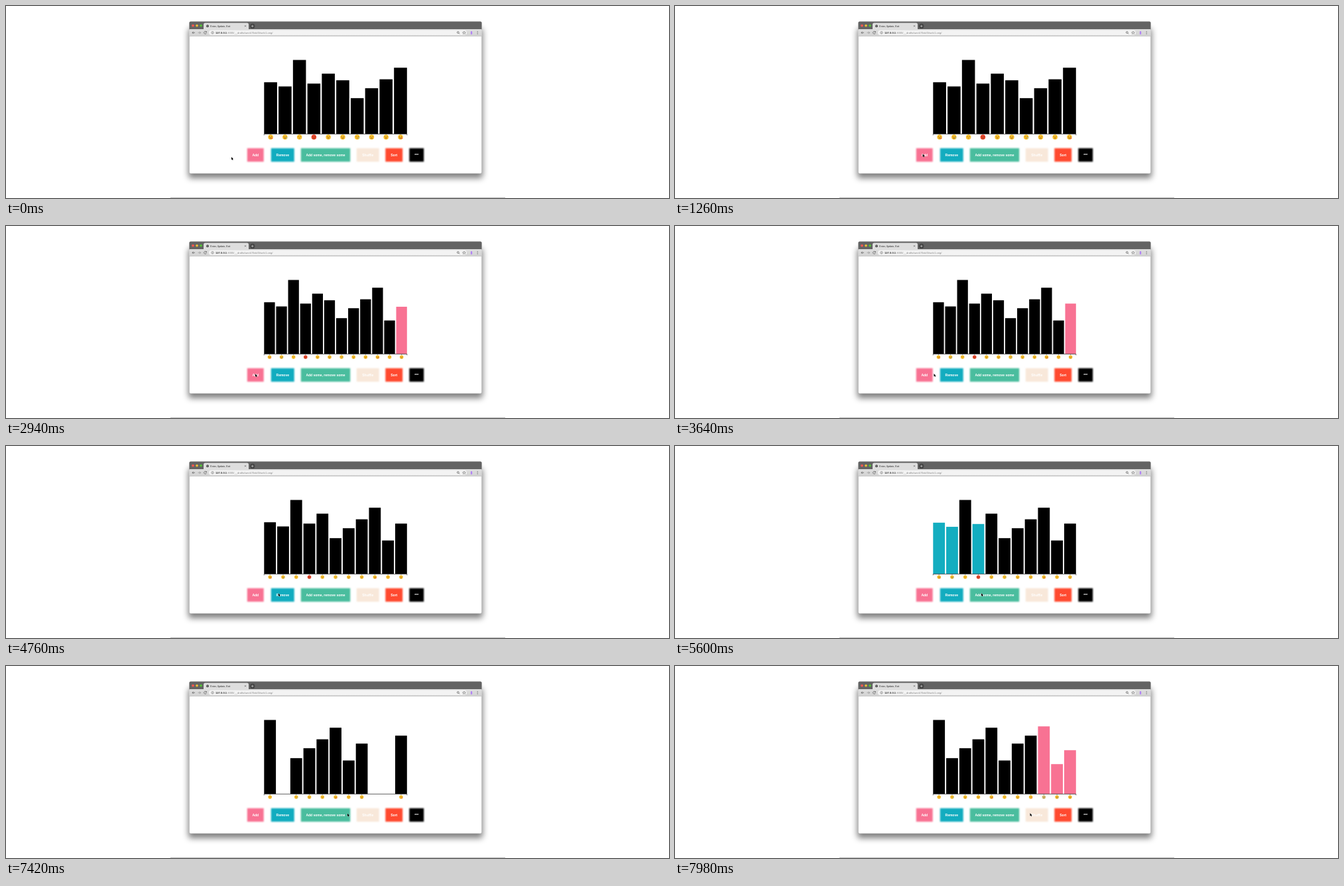
These frames come from a looping animation (1000 by 290 pixels, 8 s). An HTML page:

```html
<!DOCTYPE html>
<html lang="en">
<head>
<meta charset="utf-8">
<title>Enter, Update, Exit</title>
<style>
  html, body { margin: 0; width: 100%; height: 100%; overflow: hidden; background: #fff; }
  svg { display: block; width: 100%; height: 100%; }
  text { font-family: "Liberation Sans", Arial, sans-serif; }
  .shadow { filter: blur(5px); }
  .glow { filter: blur(1.1px); }
  .line { fill: none; stroke: #555; stroke-width: .7; }
  .label { font-size: 5px; font-weight: 700; text-anchor: middle; }
</style>
</head>
<body>
<svg id="stage" viewBox="0 0 1000 290">
  <defs>
    <linearGradient id="toolbar" x2="0" y2="1">
      <stop stop-color="#dedede"/><stop offset="1" stop-color="#d2d2d2"/>
    </linearGradient>
  </defs>
  <path d="M248 289.5H753" stroke="#bdbdbd"/>

  <rect class="shadow" x="275" y="34" width="444" height="226" rx="4" opacity=".5"/>
  <rect x="276.5" y="23.5" width="441" height="229.5" rx="2" fill="#fff" stroke="#aaa" stroke-width=".4"/>
  <path d="M276.5 36V25.5a2 2 0 0 1 2-2H715.500a2 2 0 0 1 2 2V36z" fill="#636363"/>
  <circle cx="282" cy="29.600" r="1.900" fill="#fb5752"/>
  <circle cx="288" cy="29.600" r="1.900" fill="#e6b93a"/>
  <circle cx="294" cy="29.600" r="1.900" fill="#55bf3a"/>
  <rect x="276.500" y="35" width="441" height="10.500" fill="url(#toolbar)"/>
  <path d="M298 35.500V28q0-2.500 2.500-2.500H363.500q2.500 0 2.500 2.500V35.500z" fill="#dedede"/>
  <rect x="306" y="36.600" width="389" height="7.400" rx="3.700" fill="#f3f3f3"/>
  <path d="M276.500 45.500H717.500" stroke="#b5b5b5" stroke-width=".6"/>

  <circle cx="304" cy="30.300" r="2" fill="#444"/>
  <path d="M302.600 29.800l1.400 .2 .4 1.400M304.600 28.800l1 1" stroke="#ddd" stroke-width=".5" fill="none"/>
  <text x="308.300" y="31.600" font-size="3.600" fill="#222">Enter, Update, Exit</text>
  <path class="line" d="M360 29.300l2 2m0-2l-2 2"/>
  <circle cx="371.700" cy="30.400" r="3.700" fill="#444"/>
  <path d="M369.900 30.400h3.600m-1.800-1.800v3.600" stroke="#ccc" stroke-width=".7"/>

  <path class="line" d="M285 40.300h-4m1.700-1.700l-1.700 1.700 1.700 1.700"/>
  <path class="line" d="M289.500 40.300h4m-1.700-1.700l1.700 1.700-1.700 1.700" opacity=".55"/>
  <path class="line" d="M302.100 39.300a1.900 1.900 0 1 0 .2 1.500M302.400 38v1.500h-1.500"/>
  <circle class="line" cx="311.500" cy="40.300" r="1.800" style="stroke-width:.5"/>
  <path class="line" d="M311.500 39.200v.5m0 .4v1.400" style="stroke-width:.5"/>
  <text x="316" y="41.800" font-size="4.100" fill="#888"><tspan fill="#333" font-weight="700">127.0.0.1</tspan>:3000/__drafts/week7/lab/3/web1-orig/</text>
  <circle class="line" cx="681.800" cy="39.900" r="1.400"/>
  <path class="line" d="M682.800 41l1.400 1.400"/>
  <path d="M691 38l.7 1.600 1.700 .1-1.300 1.100 .4 1.700-1.500-.9-1.500 .9 .4-1.700-1.300-1.100 1.700-.1z" fill="none" stroke="#555" stroke-width=".5"/>
  <rect x="700.900" y="38" width="2.300" height="5" rx="1.100" fill="#b184f5"/>
  <path d="M711.200 38.500v.1m0 1.700v.1m0 1.700v.1" stroke="#555" stroke-width="1" stroke-linecap="round"/>

  <g id="buttons"></g>
  <g id="bars"></g>
  <path d="M389.300 195.300V193.400H604.800V195.300" fill="none" stroke="#222" stroke-width=".7"/>
  <g id="faces"></g>
  <path id="cursor" d="M0 0V4.300L1 3.500 1.700 5 2.500 4.600 1.800 3.200H3.100z" fill="#000" stroke="#fff" stroke-width=".4" paint-order="stroke"/>
</svg>
<script>
const LOOP = 8000, STEP = 140, PHASE = 280;
const LEFT = 389.3, WIDTH = 215.5, BASE = 193.2;
const PINK = '#f87293', TEAL = '#13adc0';

const heights = [78, 71.7, 111.7, 76, 91, 81, 54, 69, 82.5, 100,
                 50.5, 76, 65, 76, 88, 102, 45, 66];
const operations = [
  { at: 1610, drop: [], add: [10] },
  { at: 2450, drop: [], add: [11] },
  { at: 4210, drop: [5], add: [] },
  { at: 5565, drop: [0, 1, 3], add: [12, 13, 14] },
  { at: 7140, drop: [4, 12, 13], add: [15, 16, 17] }
];
const pointerPath = [
  [0, 340, 228], [500, 340, 228], [1400, 376, 223.3], [3100, 376, 223.3],
  [3640, 390.5, 223], [4060, 410.8, 222.5], [4900, 410.8, 222.5],
  [5460, 462, 222.2], [5800, 462, 222.2], [6580, 526.5, 217.8],
  [7000, 506, 223], [7200, 506, 223], [7800, 535.5, 222.3], [LOOP, 535.5, 222.3]
];
const buttons = [
  [363, 389.5, PINK, 'Add'],
  [399, 435.5, '#12acbf', 'Remove'],
  [444, 520, '#4abd9e', 'Add some, remove some'],
  [528, 563.5, '#f8e8da', 'Shuffle'],
  [571.5, 599, '#ff4a30', 'Sort'],
  [607.5, 631, '#000', '***']
];

const $ = id => document.getElementById(id);
const clamp = v => Math.max(0, Math.min(1, v));
const mix = (a, b, p) => a + (b - a) * p;
const ease = p => p < .5 ? 4 * p ** 3 : 1 - 4 * (1 - p) ** 3;

function make(parent, tag, attrs, text = '') {
  const node = document.createElementNS('http://www.w3.org/2000/svg', tag);
  set(node, attrs);
  node.textContent = text;
  return parent.appendChild(node);
}
function set(node, attrs) {
  for (const key in attrs) node.setAttribute(key, attrs[key]);
}

for (const [x1, x2, fill, label] of buttons) {
  const box = (inset, cls) => make($('buttons'), 'rect', {
    x: x1 + inset, y: 214 + inset, width: x2 - x1 - 2 * inset, height: 22 - 2 * inset, fill, class: cls
  });
  box(.8, 'glow');
  box(2.8, '');
  make($('buttons'), 'text', { class: 'label', x: (x1 + x2) / 2, y: 226.9, fill: '#fff' }, label);
}

function makeFace(id) {
  const face = make($('faces'), 'g', {});
  const angry = id === 3;
  make(face, 'circle', { r: 2.8, fill: angry ? '#e8442a' : id === 15 ? '#d9c27a' : '#fbc02d' });
  make(face, 'path', { d: 'M-1.1-.9v.7M1.100-.9v.7', stroke: '#6b4318', 'stroke-width': .6 });
  const mouths = ['M-1 1h2', 'M-1.300 .7q1.300 1.400 2.600 0', 'M-.4 1.200h.8', 'M-1.200 1.500q1.200-1 2.400 0'];
  make(face, 'path', { d: mouths[id % 4], fill: 'none', stroke: '#7a4a12', 'stroke-width': .6 });
  if ([1, 6, 13, 16].includes(id)) make(face, 'circle', { cx: 1.7, cy: .8, r: .6, fill: '#58b4e5' });
  if ([0, 9, 14].includes(id)) make(face, 'circle', { cx: 1.6, cy: 1.3, r: .7, fill: '#ee5a45' });
  return face;
}

const items = heights.map((height, id) => ({
  height,
  bar: make($('bars'), 'rect', {}),
  tick: make($('faces'), 'path', { d: 'M0 193.400V195', stroke: '#333', 'stroke-width': .5 }),
  face: makeFace(id)
}));

// Each scene is the list after an operation, plus when its phases begin.
const scenes = [{ ids: [...Array(10).keys()], add: [], drop: [], exit: -1e4, update: -1e4 }];
for (const { at, drop, add } of operations) {
  const kept = scenes.at(-1).ids.filter(id => !drop.includes(id));
  scenes.push({ ids: [...kept, ...add], add, drop, exit: at, update: at + (drop.length ? PHASE : 0) });
}

function band(ids, id) {
  const step = WIDTH / (ids.length - .1);
  return { x: LEFT + step * ids.indexOf(id), width: step * .9 };
}

function drawBars(t) {
  const index = scenes.findLastIndex(s => t >= s.update);
  const scene = scenes[index], before = scenes[Math.max(0, index - 1)], next = scenes[index + 1];
  const slide = ease(clamp((t - scene.update) / PHASE));
  const grow = ease(clamp((t - scene.update - PHASE) / PHASE));
  const leaving = next && t >= next.exit ? next.drop : [];
  const shrink = leaving.length ? ease(clamp((t - next.exit) / PHASE)) : 0;

  items.forEach(({ bar, tick, face, height }, id) => {
    const shown = scene.ids.includes(id);
    for (const node of [bar, tick, face]) node.style.display = shown ? '' : 'none';
    if (!shown) return;

    const entering = scene.add.includes(id), exiting = leaving.includes(id);
    const to = band(scene.ids, id);
    const from = entering ? to : band(before.ids, id);
    const x = mix(from.x, to.x, slide), width = mix(from.width, to.width, slide);
    const h = height * (entering ? grow : 1) * (exiting ? 1 - shrink : 1);
    const centre = x + width / 2, opacity = entering ? slide : 1;

    set(bar, { x, y: BASE - h, width, height: h, fill: exiting ? TEAL : entering ? PINK : '#000' });
    set(tick, { transform: `translate(${centre})`, opacity });
    set(face, { transform: `translate(${centre} 198) scale(${index ? 1 : 1.35})`, opacity });
  });
}

function drawPointer(t) {
  const i = pointerPath.findIndex(p => p[0] > t);
  const [t0, x0, y0] = pointerPath[i - 1], [t1, x1, y1] = pointerPath[i];
  const p = (t - t0) / (t1 - t0), s = p * p * (3 - 2 * p);
  set($('cursor'), { transform: `translate(${mix(x0, x1, s)} ${mix(y0, y1, s)})` });
}

function frame() {
  const t = Math.floor(performance.now() % LOOP / STEP) * STEP;
  drawBars(t);
  drawPointer(t);
  requestAnimationFrame(frame);
}
frame();
</script>
</body>
</html>
```
